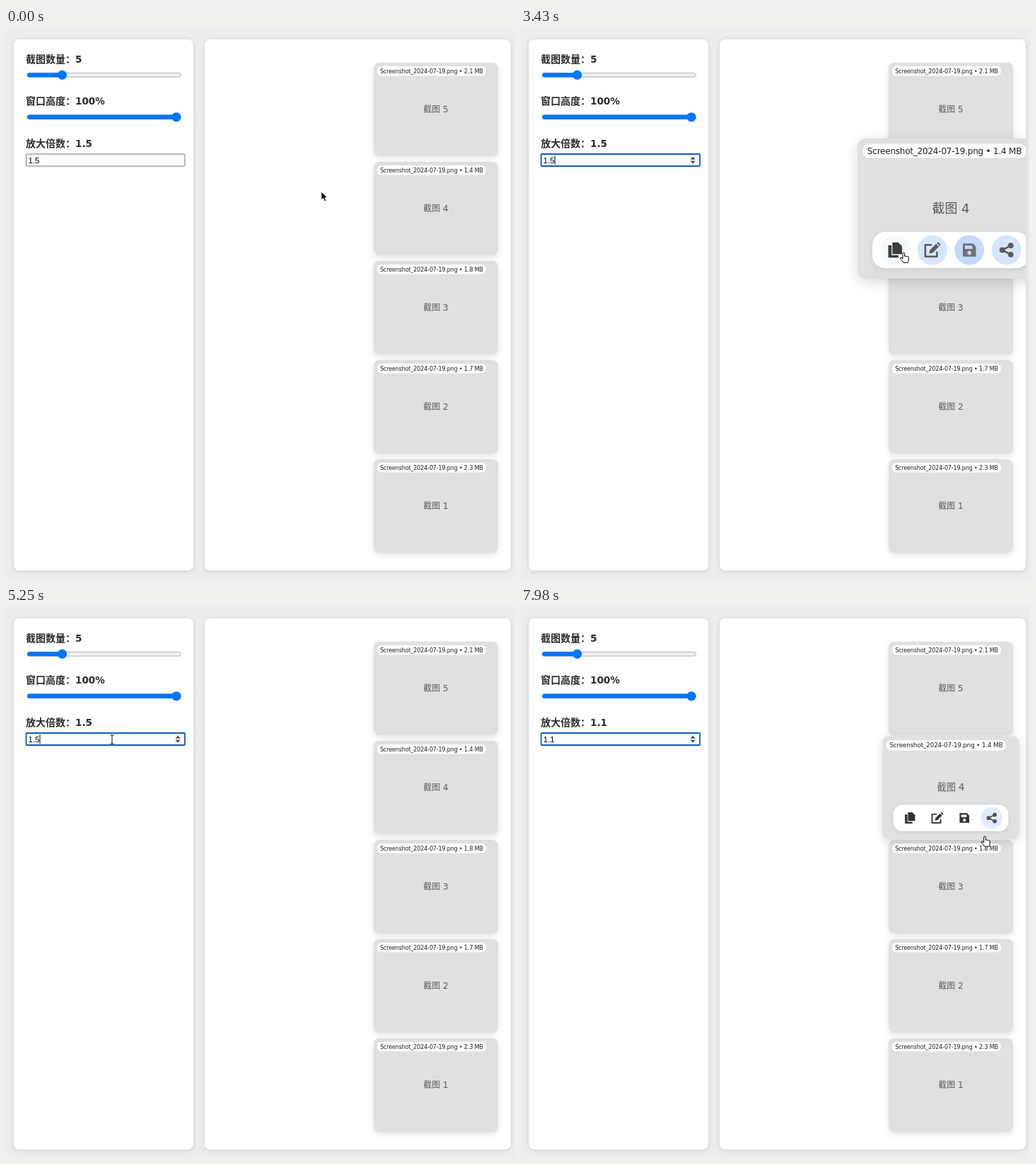
Write an HTML page that moves like this. It is 720 px wide and 778 px high and loops after 8000 ms.

```html
<!DOCTYPE html>
<html lang="zh-CN">
<head>
<meta charset="utf-8">
<title>截图预览</title>
<style>
  html, body { margin: 0; width: 100%; height: 100%; overflow: hidden; background: #ededed; }
  svg { display: block; font-family: "DejaVu Sans", "Noto Sans CJK SC", sans-serif; }
  .panel { fill: #fff; filter: drop-shadow(0 1px 3px rgba(0, 0, 0, .13)); }
  .label { font-size: 14px; font-weight: bold; fill: #2b2b2b; }
  .label tspan { font-size: 13.5px; }
  .card { filter: drop-shadow(0 3px 4px rgba(0, 0, 0, .11)); }
  .card text { text-anchor: middle; }
  .title { font-size: 12px; fill: #5c5c5c; }
  .file { font-size: 8px; letter-spacing: -.14px; fill: #222; }
  .bar { filter: drop-shadow(0 1px 2px rgba(0, 0, 0, .1)); }
  .field { font: 11.5px "Liberation Sans", Arial, sans-serif; }
  .line { fill: none; stroke: currentColor; stroke-width: 1.7; }
  .solid { fill: currentColor; fill-rule: evenodd; }
</style>
</head>
<body>
<svg width="720" height="778" viewBox="0 0 720 778">
  <clipPath id="clip"><rect x="281" y="16" width="433" height="750" rx="8"/></clipPath>
  <rect class="panel" x="11" y="16" width="254" height="750" rx="8"/>
  <rect class="panel" x="281" y="16" width="433" height="750" rx="8"/>

  <g class="label">
    <text x="28" y="49">截图数量：<tspan x="98">5</tspan></text>
    <text x="28" y="108">窗口高度：<tspan x="98">100%</tspan></text>
    <text x="28" y="168">放大倍数：<tspan x="98" id="factor">1.5</tspan></text>
  </g>
  <g id="sliders"></g>

  <rect id="box" x="28.5" y="178" width="224.5" height="17" rx="1" fill="#fff"/>
  <text id="value" class="field" x="31.5" y="191">1.5</text>
  <rect id="caret" y="180" width="1" height="13"/>
  <g id="spinner">
    <rect x="238" y="180" width="10.5" height="13" rx="2" fill="#efefef"/>
    <path d="M239.8 185.4l3.3-3.6l3.3 3.6zM239.8 187.8l3.3 3.6l3.3-3.6z" fill="#444"/>
  </g>

  <g id="stack" clip-path="url(#clip)"></g>

  <g id="cursor">
    <path id="arrow" d="M0 0V11.8L2.8 9.3L4.7 13.8L6.9 12.9L5 8.6H8.6Z" stroke="#fff" stroke-width=".9"/>
    <path id="hand" fill="#fff" stroke="#000" d="M-1.3 8V1.2a1.3 1.3 0 0 1 2.6 0V5.2q1.2-1 2.3 .2q1.2-.7 2 .4q1.6-.4 1.6 1.4v2.8q0 1.8-1.2 4.2h-6.4q-1-2-3.4-4.6q-1.6-2-.4-2.6q1-.4 2.9 1.8z"/>
    <path id="beam" fill="none" stroke="#000" d="M-2.5-6.5Q0-6.5 0-5V5Q0 6.5-2.5 6.5M2.5-6.5Q0-6.5 0-5M0 5Q0 6.5 2.5 6.5"/>
  </g>
</svg>
<script>
const LOOP = 8000, STEP = 70, TRAVEL = 450, GROW = 300, FADE = 200;
const CARD = { x: 608, y: 255 }, BUTTON_Y = 39, BUTTON_R = 14;

// Pointer stops: arrival time, x, y
const stops = [
  [0, 446, 231], [210, 330, 206], [1260, 200, 188], [1750, 601, 257],
  [2660, 584, 306], [3150, 687, 312], [3650, 405, 322], [4340, 590, 275],
  [4620, 430, 289], [5180, 150, 187], [7700, 664, 298], [7910, 656, 324]
];
// Card visits: start, end, magnification
const visits = [[1880, 3500, 1.5], [4150, 4585, 1.5], [7490, LOOP + GROW, 1.1]];
// Input states: start, value, focus
const states = [
  [0, '1.5', false], [1400, '1.5', true], [3640, '1.5', false],
  [5240, '1.5', true], [6160, '1.', true], [6360, '1.1', true]
];

const $ = id => document.getElementById(id);
const show = (el, on) => el.setAttribute('visibility', on ? 'visible' : 'hidden');
const within = (t, [on, off]) => t >= on && t < off;
const clamp = x => Math.min(1, Math.max(0, x));
const buttonX = i => 35 * (i - 1.5);

const slider = (y, knob) => `
  <rect x="30.5" y="${y - 2.8}" width="217" height="5.6" rx="2.8" fill="#efefef" stroke="#b6b6b6"/>
  <rect x="30" y="${y - 3.2}" width="${knob - 30}" height="6.4" rx="3.2" fill="#0075ff"/>
  <circle cx="${knob}" cy="${y}" r="6.6" fill="#0075ff"/>`;
$('sliders').innerHTML = slider(66.4, 79.5) + slider(125.8, 241);

const dot = (x, y) => `<circle class="solid" cx="${x}" cy="${y}" r="2.6"/>`;
const icons = [
  // copy, edit, save, share
  '<path class="solid" d="M-2.6-7.2H3L6.5-3.7V3.8H-2.6ZM-6.5-4.5H-3.4V4.8H3V7.2H-6.5Z"/>',
  '<path class="line" stroke-linejoin="round" d="M-.5-4.8H-6.6V6.2H4.4V1.5"/>' +
    '<path class="solid" d="M-3 3.4L-2.2 0L3.6-5.8L6.2-3.2L.4 2.6ZM4.3-6.5L5.5-7.6L8-5.1L6.9-3.9Z"/>',
  '<path class="solid" d="M-6.2-6.2H3.2L6.2-3.2V6.2H-6.2ZM-4.2-4.2V-1H2.8V-4.2ZM0 .8a1.9 1.9 0 1 0 .01 0Z"/>',
  '<path class="line" d="M4-4.2L-4 0L4 4.2"/>' + dot(4, -4.2) + dot(-4, 0) + dot(4, 4.2)
];

const toolbar = `<g id="toolbar">
  <rect class="bar" x="-74" y="22" width="148" height="34" rx="12" fill="#fff"/>
  ${icons.map((icon, i) => `<g class="button" transform="translate(${buttonX(i)} ${BUTTON_Y})">
    <circle r="${BUTTON_R}" fill="#3b82f6"/>${icon}</g>`).join('')}</g>`;

$('stack').innerHTML = ['2.3', '1.7', '1.8', '1.4', '2.1'].map((size, i) => `
  <g class="card" id="card${i + 1}" transform="translate(${CARD.x} ${675 - 140 * i})">
    <rect x="-88" y="-66" width="176" height="132" rx="8" fill="#e0e0e0"/>
    <text class="title" y="4">截图 ${i + 1}</text>
    <rect x="-83" y="-61" width="154" height="13.4" rx="6" fill="#fff" fill-opacity=".92"/>
    <text class="file" x="-6" y="-51.4">Screenshot_2024-07-19.png • ${size} MB</text>
    ${i === 3 ? toolbar : ''}
  </g>`).join('');
const buttons = document.querySelectorAll('.button');

// CSS "ease", solved by bisection
function ease(x) {
  x = clamp(x);
  let low = 0, high = 1, u;
  for (let i = 0; i < 16; i++) {
    u = (low + high) / 2;
    if (.75 * u * (1 - u) + u ** 3 < x) low = u; else high = u;
  }
  return .3 * u * (1 - u) ** 2 + 3 * u * u * (1 - u) + u ** 3;
}
const pulse = (t, on, off, length) => ease((t - on) / length) - ease((t - off) / length);

// The pointer rests at each stop, then glides to arrive at the next one on time
function pointer(t) {
  const next = stops.findIndex(stop => stop[0] > t);
  if (next < 1) return stops.at(next).slice(1);
  const [t0, x0, y0] = stops[next - 1], [t1, x1, y1] = stops[next];
  const u = clamp(1 - (t1 - t) / Math.min(TRAVEL, t1 - t0));
  const k = u * u * (3 - 2 * u);
  return [x0 + (x1 - x0) * k, y0 + (y1 - y0) * k];
}

// Share of the last moments that the pointer spent on a button
function glow(t, i, scale) {
  const samples = 20;
  let inside = 0;
  for (let n = 0; n < samples; n++) {
    const [x, y] = pointer(Math.max(0, t - FADE * n / samples));
    const dx = x - CARD.x - scale * buttonX(i), dy = y - CARD.y - scale * BUTTON_Y;
    if (Math.hypot(dx, dy) < BUTTON_R * scale) inside++;
  }
  return inside / samples;
}

function drawCard(t, hovered) {
  let scale = 1, opacity = 0;
  for (const [on, off, zoom] of visits) {
    scale += (zoom - 1) * pulse(t, on, off, GROW);
    opacity += pulse(t, on, off, FADE);
  }
  const card = $('card4');
  card.setAttribute('transform', `translate(${CARD.x} ${CARD.y}) scale(${scale})`);
  card.style.filter = `drop-shadow(0 3px ${4 + 2 * opacity}px rgba(0, 0, 0, ${.11 + .04 * opacity}))`;
  $('stack').insertBefore(card, hovered ? null : $('card5'));
  $('toolbar').setAttribute('opacity', opacity);
  buttons.forEach((button, i) => {
    const p = glow(t, i, scale), shade = 51 + 204 * p;
    button.style.color = `rgb(${shade}, ${shade}, ${shade})`;
    button.firstElementChild.setAttribute('opacity', p);
  });
}

function drawField(t) {
  const [since, value, focused] = states.findLast(state => state[0] <= t);
  $('value').textContent = value;
  $('factor').textContent = parseFloat(value);
  $('box').setAttribute('stroke', focused ? '#1259b8' : '#767676');
  $('box').setAttribute('stroke-width', focused ? 1.8 : 1);
  show($('spinner'), focused);
  $('caret').setAttribute('x', 31.5 + $('value').getComputedTextLength());
  show($('caret'), focused && Math.floor((t - since) / 500) % 2 === 0);
}

function drawPointer(t, hovered) {
  const [x, y] = pointer(t);
  const overField = x > 28 && x < 253 && y > 178 && y < 196;
  const typing = overField && t > 6160;
  $('cursor').setAttribute('transform', `translate(${x} ${y})`);
  show($('hand'), hovered);
  show($('beam'), overField && !typing);
  show($('arrow'), !hovered && !overField);
}

function tick() {
  const t = Math.floor(performance.now() % LOOP / STEP) * STEP;
  const hovered = visits.some(visit => within(t, visit));
  drawCard(t, hovered);
  drawField(t);
  drawPointer(t, hovered);
  requestAnimationFrame(tick);
}
tick();
</script>
</body>
</html>
```
